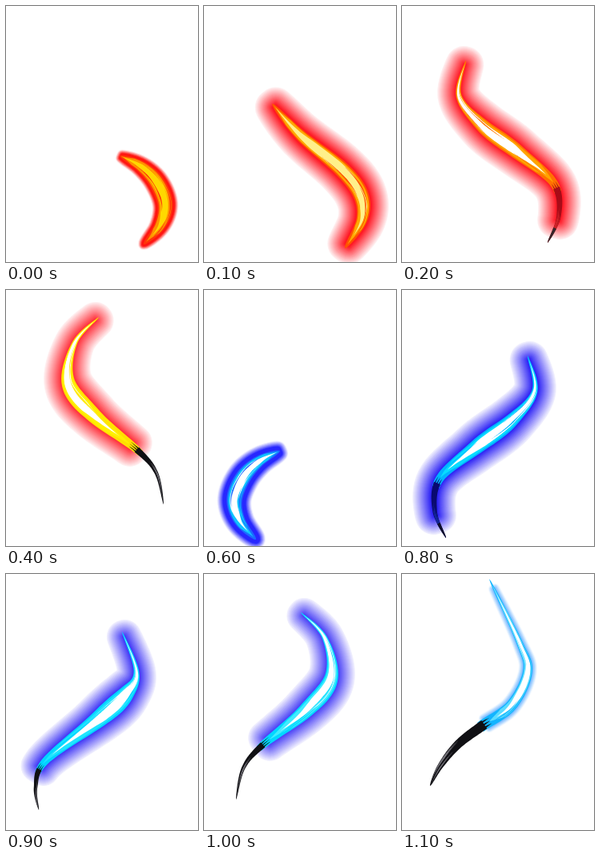
Animation, 240 px wide and 320 px high, one loop 1.2 s. Source, as an HTML page with a canvas:

```html
<!DOCTYPE html>
<html lang="en">
<head>
<meta charset="utf-8">
<title>Flame slash</title>
<style>
html, body { margin: 0; width: 100%; height: 100%; overflow: hidden; background: #fff; }
canvas { display: block; }
</style>
</head>
<body>
<canvas id="stage" width="240" height="320"></canvas>
<script>
const ctx = document.getElementById('stage').getContext('2d');
const STEP = 100, COUNT = 12;

// Centre lines from tail to head
const lines = [
  [[172,298],[192,275],[199,248],[188,220],[168,200],[142,187]],
  [[176,303],[197,268],[196,236],[172,204],[120,161],[85,122]],
  [[182,296],[196,262],[190,222],[145,183],[100,149],[71,112],[80,68]],
  [[196,281],[200,253],[188,220],[122,168],[87,136],[74,108],[92,58]],
  [[197,268],[188,229],[165,201],[110,157],[78,116],[86,66],[116,34]],
  [[202,251],[189,226],[167,199],[137,176],[100,150],[80,108],[90,72],[128,-8]]
];
// Half width: base along the line plus a bulge in the flame
const base = [10, 10, 5, 4, 4, 7];
const bulge = [0, 0, 5, 8, 6.5, 0];
// Where the glow begins and the burnt tail ends along the line
const glowFrom = [0, .04, .14, .3, .36, .45];
const burnTo = [0, 0, .31, .29, .34, .44];

const red = [255, 24, 36], blue = [42, 32, 245];
const look = (glow, reach, power, ...fills) => ({ glow, reach, power, fills });
const looks = [
  look([255, 20, 16], 7, 1.5, '#ff3408', '#ff9000', '#ffd800'),
  look(red, 23, 1, '#ff5200', '#ffa800', '#fff08a'),
  look(red, 23, .95, '#ff7200', '#ffa400', '#fff'),
  look(red, 23, .9, '#ffa800', '#ffd000', '#fff'),
  look(red, 22, .85, '#ffe000', '#fff000', '#fff'),
  look([255, 130, 50], 6, .8, '#ffc400', '#ffe400', '#fff'),
  look([40, 40, 255], 12, 1.6, '#1a6cff', '#10c4ff', '#fff'),
  look(blue, 23, 1.1, '#0c90ff', '#08ccff', '#fff'),
  look(blue, 23, .95, '#00b4ff', '#08dcff', '#fff'),
  look(blue, 21, .85, '#00d4ff', '#20e4ff', '#fff'),
  look(blue, 21, .8, '#00d8ff', '#40ecff', '#fff'),
  look([90, 170, 255], 6, .85, '#12b4ff', '#5cdcff', '#fff')
];

function random(seed) {
  return () => (seed = (seed * 16807) % 2147483647) / 2147483647;
}

function spline(points, u) {
  const last = points.length - 1, s = u * last;
  const i = Math.min(last - 1, Math.floor(s)), t = s - i;
  const [a, b, c, d] = [-1, 0, 1, 2].map(k => points[Math.max(0, Math.min(last, i + k))]);
  return [0, 1].map(k => b[k] + t / 2 * (c[k] - a[k] +
    t * (2 * a[k] - 5 * b[k] + 4 * c[k] - d[k] + t * (3 * (b[k] - c[k]) + d[k] - a[k]))));
}

function halfWidth(k, u) {
  const arch = Math.max(0, Math.sin(Math.PI * u));
  return base[k] * arch ** .7 + bulge[k] * Math.exp(-(((u - .58) / .17) ** 2));
}

// Outline of a strand; shift moves it sideways in units of half width
function ribbon({ points, k }, from, to, scale, shift = 0, taper = 0) {
  const left = [], right = [], n = 50;
  for (let i = 0; i <= n; i++) {
    const v = i / n, u = Math.max(0, Math.min(1, from + (to - from) * v));
    const [x, y] = spline(points, u);
    const p = spline(points, Math.max(0, u - .005)), q = spline(points, Math.min(1, u + .005));
    const len = Math.hypot(q[0] - p[0], q[1] - p[1]) || 1;
    const nx = (p[1] - q[1]) / len, ny = (q[0] - p[0]) / len;
    const half = halfWidth(k, u), m = half * shift;
    const r = half * scale * (taper ? Math.min(1, v / taper, (1 - v) / taper) : 1);
    left.push([x + nx * (m + r), y + ny * (m + r)]);
    right.unshift([x + nx * (m - r), y + ny * (m - r)]);
  }
  const path = new Path2D();
  left.concat(right).forEach(p => path.lineTo(p[0], p[1]));
  path.closePath();
  return path;
}

function fill(path, color) {
  ctx.fillStyle = color;
  ctx.fill(path);
}

function drawGlow(flame, { glow, reach, power }) {
  const path = ribbon(flame, glowFrom[flame.k], .97, 1);
  ctx.lineJoin = ctx.lineCap = 'round';
  for (let r = reach; r > 0; r--) {
    const a = Math.min(1, .07 + power * (1 - r / reach));
    ctx.strokeStyle = `rgb(${glow.map(c => Math.round(255 + (c - 255) * a))})`;
    ctx.lineWidth = 2 * r;
    ctx.stroke(path);
  }
}

function drawTail(flame, warm) {
  const end = burnTo[flame.k];
  if (!end) return;
  const rnd = random(91 + flame.k), hot = flame.k === 2;
  const dark = !hot ? '#101014' : warm ? '#a80c18' : '#0a0a70';
  const pale = !hot ? '#77757c' : warm ? '#e03030' : '#1838b0';
  fill(ribbon(flame, 0, end, .9), dark);
  for (let i = -1; i < 2; i++) {
    fill(ribbon(flame, end - .07, end + .03, .25, i * .55, .5), dark);
  }
  for (let i = 0; i < 5; i++) {
    const a = rnd() * end * .35;
    fill(ribbon(flame, a, a + end * .5, .14, rnd() * 1.3 - .65, .5), pale);
  }
  if (hot) fill(ribbon(flame, 0, .1, .9), warm ? '#38262a' : '#10102c');
}

function drawFlame(index) {
  const k = index % 6, warm = index < 6;
  const points = warm ? lines[k] : lines[k].map(([x, y]) => [237 - x, y + 14]);
  const flame = { points, k };
  const [body, mid, core] = looks[index].fills;
  const start = burnTo[k], at = v => start + (1 - start) * v;
  const rnd = random(317 + k * 29);

  ctx.fillStyle = '#fff';
  ctx.fillRect(0, 0, 240, 320);
  drawGlow(flame, looks[index]);
  fill(ribbon(flame, Math.max(0, start - .02), 1, 1), body);
  fill(ribbon(flame, at(.04), at(.98), .8, 0, .12), mid);
  fill(ribbon(flame, at(.1), at(.96), .58, 0, .25), core);
  for (let i = 0; i < 7; i++) {
    const a = rnd() * .6, side = rnd() < .5 ? -1 : 1;
    fill(ribbon(flame, at(a), at(a + .3), .09, side * (.3 + rnd() * .4), .5), i % 2 ? mid : body);
  }
  drawTail(flame, warm);
}

let shown = -1;
const begin = performance.now();
function tick() {
  const index = Math.floor((performance.now() - begin) / STEP) % COUNT;
  if (index !== shown) drawFlame(shown = index);
  requestAnimationFrame(tick);
}
tick();
</script>
</body>
</html>
```
